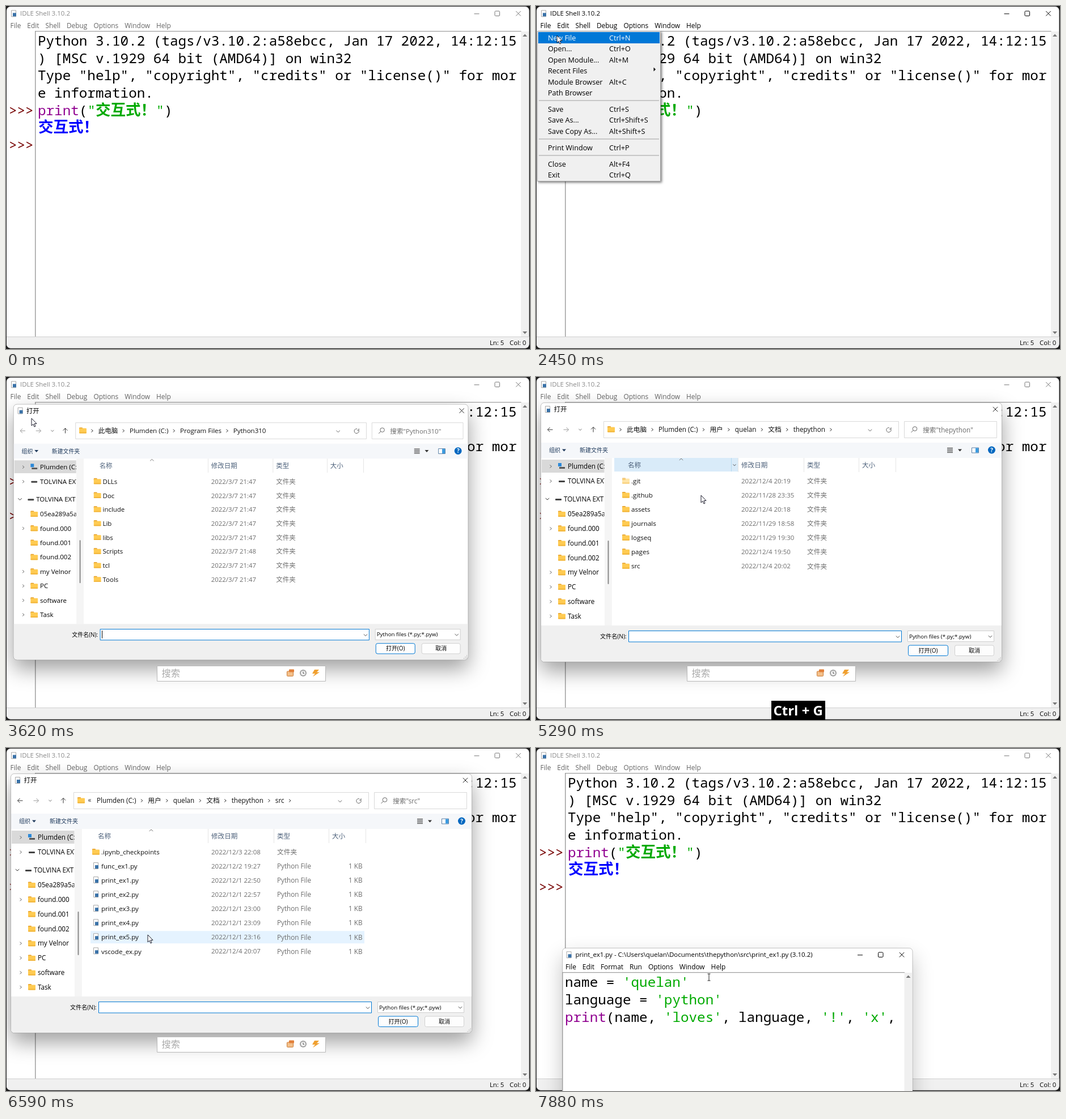
An HTML page with a canvas that plays this animation: 924 by 606 pixels, repeating every 8 s.

```html
<!DOCTYPE html>
<html lang="zh-CN">
<head>
<meta charset="utf-8">
<title>IDLE Shell</title>
<style>
html, body { margin: 0; width: 100%; height: 100%; overflow: hidden; background: #1c1c1c; }
canvas { display: block; width: 924px; height: 606px; }
</style>
</head>
<body>
<canvas id="stage" width="924" height="606"></canvas>
<script>
const c = document.getElementById('stage').getContext('2d');
const CJK = '"Noto Sans CJK SC","Noto Sans CJK","Noto Sans SC",sans-serif';
const UI = '"Open Sans",' + CJK;
const MONO = '"Noto Sans Mono",' + CJK;
const LOOP = 8000, STEP = 130;
const CODE = 24.28, PITCH = 14.57, LINE = 30.67;
const GREEN = '#00aa00', PURPLE = '#900090', BLUE = '#0067c0', GRAY = '#6d6d6d';

// Bursts of screen updates: start time, number of steps
const BURSTS = [[0, 1], [380, 1], [630, 7], [1540, 7], [2450, 7], [3360, 7],
  [4390, 4], [5030, 7], [5940, 6], [6840, 7], [7750, 2]];

// Pointer path: time, x, y
const PATH = [[500, 411, 364], [760, 330, 290], [1020, 150, 140], [1280, 55, 55], [1410, 36, 40],
  [1540, 24, 37], [2060, 22, 37], [2450, 37, 52], [2840, 45, 73], [3620, 45, 73],
  [4140, 232, 158], [5030, 245, 158], [5160, 268, 165], [5290, 291, 209], [5420, 322, 236],
  [5550, 316, 256], [5810, 270, 308], [5940, 258, 319], [6200, 250, 333], [6590, 250, 330],
  [6840, 250, 290], [7100, 247, 235], [7620, 247, 235], [7750, 305, 405]];
const CLICKS = [1670, 2970, 6200, 7100];

const FILE_MENU = [
  [56, 'New File', 'Ctrl+N'], [75.5, 'Open...', 'Ctrl+O'], [95, 'Open Module...', 'Alt+M'],
  [114, 'Recent Files', ''], [134, 'Module Browser', 'Alt+C'], [153, 'Path Browser', ''],
  [182, 'Save', 'Ctrl+S'], [201.5, 'Save As...', 'Ctrl+Shift+S'], [221, 'Save Copy As...', 'Alt+Shift+S'],
  [250, 'Print Window', 'Ctrl+P'], [279, 'Close', 'Alt+F4'], [298.5, 'Exit', 'Ctrl+Q']];

const DRIVE = 'Plumden (C:)';
const FOLDERS = {
  Python310: {
    path: ['此电脑', DRIVE, 'Program Files', 'Python310'],
    rows: 'DLLs Doc include Lib libs Scripts tcl Tools'.split(' ')
      .map(n => [n, '2022/3/7 21:4' + (n === 'Scripts' ? 8 : 7)])
  },
  thepython: {
    path: ['此电脑', DRIVE, '用户', 'quelan', '文档', 'thepython', ''],
    rows: [['.git', '2022/12/4 20:19'], ['.github', '2022/11/28 23:35'], ['assets', '2022/12/4 20:18'],
      ['journals', '2022/11/29 18:58'], ['logseq', '2022/11/29 19:30'], ['pages', '2022/12/4 19:50'],
      ['src', '2022/12/4 20:02']]
  },
  src: {
    path: [DRIVE, '用户', 'quelan', '文档', 'thepython', 'src', ''],
    rows: [['.ipynb_checkpoints', '2022/12/3 22:08'], ['func_ex1.py', '2022/12/2 19:27'],
      ['print_ex1.py', '2022/12/1 22:50'], ['print_ex2.py', '2022/12/1 22:57'],
      ['print_ex3.py', '2022/12/1 23:00'], ['print_ex4.py', '2022/12/1 23:09'],
      ['print_ex5.py', '2022/12/1 23:16'], ['vscode_ex.py', '2022/12/4 20:07']]
  }
};
const TREE = [['05ea289a5a', 0], ['found.000', 1], ['found.001', 0], ['found.002', 0],
  ['my Velnor', 1], ['PC', 1], ['software', 1], ['Task', 1]];

function rect(x, y, w, h, fill, stroke, r = 0) {
  c.beginPath();
  c.roundRect(x, y, w, h, r);
  if (fill) { c.fillStyle = fill; c.fill(); }
  if (stroke) { c.strokeStyle = stroke; c.lineWidth = 1; c.stroke(); }
}

function line(pts, color, width = 1) {
  c.beginPath();
  for (let i = 0; i < pts.length; i += 2) c.lineTo(pts[i], pts[i + 1]);
  c.strokeStyle = color;
  c.lineWidth = width;
  c.stroke();
}

function poly(pts, fill) {
  c.beginPath();
  for (let i = 0; i < pts.length; i += 2) c.lineTo(pts[i], pts[i + 1]);
  c.closePath();
  c.fillStyle = fill;
  c.fill();
}

function disc(x, y, r, fill) {
  c.beginPath();
  c.arc(x, y, r, 0, 7);
  c.fillStyle = fill;
  c.fill();
}

// Draws text centred vertically on y and returns its width
function text(s, x, y, size, color = '#000', font = UI, weight = 400) {
  c.font = `${weight} ${size}px ${font}`;
  c.fillStyle = color;
  c.fillText(s, x, y + size * 0.36);
  return c.measureText(s).width;
}

// parts: text and colour in turn
function code(x, y, ...parts) {
  for (let i = 0; i < parts.length; i += 2) {
    text(parts[i], x, y, CODE, parts[i + 1], MONO);
    x += parts[i].length * PITCH;
  }
}

function chevron(x, y, dir, color = '#666', s = 2.5) {
  const h = s * 0.6;
  if (dir === 'right') line([x - h, y - s, x + h, y, x - h, y + s], color);
  else {
    const k = dir === 'down' ? h : -h;
    line([x - s * 1.3, y - k, x, y + k, x + s * 1.3, y - k], color);
  }
}

function arrow(x, y, angle, color) {
  c.save();
  c.translate(x, y);
  c.rotate(angle);
  line([-4.5, 0, 4.5, 0], color);
  line([-0.5, -4, -4.5, 0, -0.5, 4], color);
  c.restore();
}

function cross(x, y, color, s = 4.2) {
  line([x - s, y - s, x + s, y + s], color);
  line([x - s, y + s, x + s, y - s], color);
}

function folder(x, y, faint) {
  c.globalAlpha = faint ? 0.5 : 1;
  rect(x, y - 5, 6, 4, '#e5a02c', null, 1);
  rect(x, y - 3.5, 13, 9, '#ffcb52', null, 1);
  rect(x, y + 3.5, 13, 2, '#f2b53a', null, 1);
  c.globalAlpha = 1;
}

function page(x, y) {
  rect(x + 0.5, y - 5.5, 8, 11, '#fff', '#a8a8a8');
  rect(x + 3, y - 1, 6, 6, '#3a72a8');
}

function pop(cx, cy, scale, alpha, draw) {
  c.save();
  c.globalAlpha = alpha;
  c.translate(cx, cy);
  c.scale(scale, scale);
  c.translate(-cx, -cy);
  draw();
  c.restore();
}

function shadowBox(x, y, w, h, depth) {
  c.save();
  c.shadowColor = `rgba(0,0,0,${depth})`;
  c.shadowBlur = 36;
  c.shadowOffsetY = 16;
  rect(x, y, w, h, '#fff', null, 6);
  c.restore();
  rect(x, y, w, h, null, 'rgba(0,0,0,.22)', 6);
}

// Title bar, menu bar, text border and scroll bar
function frame(x, y, right, bottom, left, title, menus, active) {
  const ink = active ? '#000' : '#777';
  const ty = y + 12.3, top = y + 43;
  page(x + 8, ty);
  text(title, x + 24, ty, 11.5, active ? '#000' : '#888');
  let mx = x + 6.5;
  for (const m of menus.split(' ')) mx += text(m, mx, y + 34, 11.9, active ? '#000' : '#666') + 11;
  line([right - 97, ty + 0.5, right - 88, ty + 0.5], ink);
  rect(right - 60.5, ty - 4.3, 8.5, 8.5, null, ink, 1.5);
  cross(right - 19, ty, ink);
  rect(right - 14.5, top + 1, 14, bottom - top - 1, '#f0f0f0');
  rect(left, top, right - left - 14, 1.2, '#a0a0a0');
  rect(left, top, 1.5, bottom - top, '#a0a0a0');
  const ax = right - 7.5;
  poly([ax - 4, top + 10, ax, top + 5.5, ax + 4, top + 10], '#777');
  poly([ax - 4, bottom - 9, ax, bottom - 4.5, ax + 4, bottom - 9], '#777');
}

function shell(active) {
  rect(0, 0, 924, 606, '#1c1c1c');
  rect(1, 1, 921.5, 603.5, '#fff', null, 7);
  frame(1, 1, 922.5, 584, 51, 'IDLE Shell 3.10.2', 'File Edit Shell Debug Options Window Help', active);
  rect(1, 584, 921.5, 20.5, '#f0f0f0', null, [0, 0, 7, 7]);
  rect(1, 584, 921.5, 1, '#d0d0d0');
  text('Ln: 5', 853, 595, 11.3);
  text('Col: 0', 888, 595, 11.3);

  const row = i => 61.3 + i * LINE;
  ['Python 3.10.2 (tags/v3.10.2:a58ebcc, Jan 17 2022, 14:12:15',
    ') [MSC v.1929 64 bit (AMD64)] on win32',
    'Type "help", "copyright", "credits" or "license()" for mor',
    'e information.'].forEach((s, i) => code(56, row(i), s, '#000'));
  code(56, row(4), 'print', PURPLE, '(', '#000', '"', GREEN);
  text('交互式！', 158, row(4) - 1, 26.5, GREEN, CJK, 700);
  code(264.5, row(4), '"', GREEN, ')', '#000');
  text('交互式！', 57, row(5) - 1, 26.5, '#0000ff', CJK, 700);
  for (const i of [4, 6]) code(5, row(i), '>>>', '#770000');
}

function fileMenu(y, alpha) {
  c.globalAlpha = alpha;
  c.save();
  c.shadowColor = 'rgba(0,0,0,.5)';
  c.shadowBlur = 4;
  c.shadowOffsetX = c.shadowOffsetY = 2;
  rect(2, 44, 218, 266, '#f0f0f0');
  c.restore();
  rect(2.5, 44.5, 217, 265, null, '#a0a0a0');
  for (const [my, label, keys] of FILE_MENU) {
    const on = Math.abs(y - my) < 9.7;
    if (on) rect(4, my - 10, 214, 20, '#0078d7');
    text(label, 21, my, 12.6, on ? '#fff' : '#000');
    text(keys, 129, my, 12.6, on ? '#fff' : '#000');
  }
  for (const sy of [167, 235, 264]) rect(5, sy - 0.5, 212, 1, '#a0a0a0');
  poly([207.5, 108.5, 211, 112, 207.5, 115.5], '#000');
  c.globalAlpha = 1;
}

function tree() {
  c.save();
  c.beginPath();
  c.rect(8, 143, 112.5, 296);
  c.clip();
  rect(10, 146, 112, 23, '#d9d9d9');
  chevron(26, 158, 'right');
  rect(39, 152, 6, 6, '#2b88d8');
  rect(41, 159, 10, 3, '#555');
  text(DRIVE, 56, 158, 11.7);
  chevron(26, 184, 'right');
  rect(40, 183, 11, 3, '#444', null, 1);
  text('TOLVINA EXT', 56, 184, 11.7);
  chevron(20, 215.5, 'down', '#333');
  rect(34, 215, 11, 3, '#444', null, 1);
  text('TOLVINA EXT', 49, 216, 11.7);
  TREE.forEach(([name, more], i) => {
    const y = 242 + i * 25.8;
    if (more) chevron(26, y, 'right');
    folder(39, y - 0.5);
    text(name, 56, y, 11.7);
  });
  c.restore();
  rect(121, 143, 13, 296, '#f5f5f5');
  rect(126.5, 289, 2, 77, '#8a8a8a', null, 1);
}

function fileList(rows, hover, selected) {
  const [hx, hy] = hover;
  if (hx > 138 && hx < 356 && hy > 143 && hy < 168) {
    rect(138, 143, 218, 24, '#d9ebf9');
    rect(344, 143, 1, 24, '#b5d9f0');
    chevron(350, 155.5, 'down', '#555', 2);
  }
  chevron(256, 145.5, 'up', '#777');
  for (const x of [356, 472, 569, 634]) rect(x, 143, 1, 25, '#e5e5e5');
  [['名称', 162], ['修改日期', 362], ['类型', 478], ['大小', 575]]
    .forEach(([s, x]) => text(s, x, 156, 11.6, '#4c607a'));

  rows.forEach(([name, date], i) => {
    const y = 184 + i * 25.05, file = name.endsWith('.py');
    if (i === selected) rect(149.5, y - 10.5, 482, 21, '#cce8ff', '#99d1ff');
    else if (hx > 149 && hx < 632 && Math.abs(hy - y) < 12.5) rect(149, y - 11, 483, 22, '#e5f3ff');
    if (file) page(154, y - 1);
    else folder(152, y - 1, name === '.git');
    text(name, 168, y, 11.6, '#111');
    text(date, 362, y, 11.5, GRAY);
    text(file ? 'Python File' : '文件夹', 478, y, 11.7, GRAY);
    if (file) text('1 KB', 604, y, 11.7, GRAY);
  });
}

function dialog(t, hover) {
  const name = t < 4520 ? 'Python310' : t < 6330 ? 'thepython' : 'src';
  const { path, rows } = FOLDERS[name];
  const picked = t >= 7100, closing = t >= 7230;

  shadowBox(8.5, 45.5, 813, 458, 0.38);
  if (!closing) {
    page(16, 57);
    cross(810, 57, '#222');
  }
  text('打开', closing ? 14 : 31.5, 57, 11.5);

  arrow(25, 93, 0, name === 'Python310' ? '#999' : '#333');
  arrow(53, 93, Math.PI, '#999');
  chevron(78, 93, 'down', '#777', 2);
  arrow(101, 93, Math.PI / 2, '#333');
  rect(119.5, 78.5, 520, 29, '#fff', '#d9d9d9');
  folder(126, 92);
  let x = 160;
  if (name === 'src') text('«', 144.5, 92, 11.7, '#333');
  else chevron(149, 93, 'right', '#333');
  path.forEach((s, i) => {
    if (i) {
      chevron(x + 10, 93, 'right', '#333');
      x += 21;
    }
    x += text(s, x, 93, 11.7, '#111');
  });
  chevron(589, 94, 'down');
  c.beginPath();
  c.arc(622, 93.5, 4, -0.4, 5);
  c.strokeStyle = '#666';
  c.stroke();
  line([626, 89, 626, 92, 623, 92], '#666');
  rect(649.5, 78.5, 163, 29, '#fff', '#d9d9d9');
  c.beginPath();
  c.arc(668, 91.5, 3.8, 0, 7);
  c.strokeStyle = '#666';
  c.stroke();
  line([665.3, 94.2, 661.5, 98], '#666');
  text(`搜索"${name}"`, 682, 93.5, 11.7, GRAY);

  rect(9, 116, 812, 27, '#f5f7fa');
  text('组织', 23, 129.5, 10.1, '#1e395b');
  poly([46, 127.5, 53, 127.5, 49.5, 131.5], '#1e395b');
  text('新建文件夹', 77, 129.5, 10, '#1e395b');
  for (let i = 0; i < 4; i++) rect(725, 125 + i * 2.6, 10, 1.1, '#333');
  poly([744, 127.5, 751, 127.5, 747.5, 131.5], '#333');
  rect(768.5, 125, 12, 9, '#fff', '#5a7fa5');
  rect(775, 125.5, 5, 8, '#3b9be0');
  disc(803.5, 129, 6.5, BLUE);
  text('?', 801.2, 129, 10, '#fff', UI, 700);

  tree();
  fileList(rows, hover, picked ? 2 : -1);

  rect(9, 439, 812, 64, '#f0f0f0', null, [0, 0, 6, 6]);
  text('文件名(N):', 113, 458, 10.1);
  rect(163.5, 448.5, 481, 19.5, '#fff', closing ? '#8a8a8a' : '#0078d4');
  chevron(638, 459, 'down', '#555');
  if (picked) text('print_ex1.py', 167, 459, 9.8);
  else if (Math.floor((t - 3490) / 530) % 2 === 0) rect(166.5, 451, 1, 14, '#000');
  rect(655.5, 448.5, 152, 19, '#fff', '#d0d0d0');
  text('Python files (*.py;*.pyw)', 658, 458, 9.8);
  chevron(801, 458.5, 'down', '#555');
  rect(656.5, 474, 70, 18.5, '#fdfdfd', '#0078d4', 3);
  text('打开(O)', 674.5, 483, 10.1);
  rect(738.5, 474, 69, 18.5, '#fdfdfd', '#d0d0d0', 3);
  text('取消', 763, 483, 10.1);
  for (let i = 0; i < 3; i++)
    for (let j = 0; j <= i; j++) rect(818.5 - j * 2.6, 495 + i * 2.6, 1.3, 1.3, '#b5b5b5');
}

function searchBar() {
  rect(266.5, 510.5, 297, 27, '#fff', '#b8b8b8');
  text('搜索', 274.5, 523, 16.3, '#aaa');
  rect(495.5, 520, 11, 8.5, '#f3c08b', '#c97a35', 1);
  rect(499, 516.5, 9, 5, '#e2803a', null, 1);
  disc(524, 523, 6, '#a0a0a0');
  disc(524, 523, 4, '#f2f2f2');
  line([524, 520.5, 524, 523.5, 526, 523.5], '#555');
  poly([544, 517, 552, 517, 548, 521.5, 553, 521.5, 541, 529.5, 545, 524, 540, 524], '#f0a030');
}

function editor() {
  shadowBox(46.5, 353.5, 617.5, 300, 0.24);
  frame(45.5, 353, 664, 650, 46, 'print_ex1.py - C:\\Users\\quelan\\Documents\\thepython\\src\\print_ex1.py (3.10.2)',
    'File Edit Format Run Options Window Help', true);
  const row = i => 413.5 + i * LINE;
  code(51, row(0), 'name = ', '#000', "'quelan'", GREEN);
  code(51, row(1), 'language = ', '#000', "'python'", GREEN);
  code(51, row(2), 'print', PURPLE, '(name, ', '#000', "'loves'", GREEN, ', language, ', '#000',
    "'!'", GREEN, ', ', '#000', "'x'", GREEN, ',', '#000');
}

function pointerAt(t) {
  const i = PATH.findIndex(p => p[0] > t);
  if (i === 0) return PATH[0].slice(1);
  if (i < 0) return PATH[PATH.length - 1].slice(1);
  const [t0, x0, y0] = PATH[i - 1], [t1, x1, y1] = PATH[i];
  const k = (t - t0) / (t1 - t0);
  return [x0 + (x1 - x0) * k, y0 + (y1 - y0) * k];
}

function pointer(t, [x, y]) {
  if (CLICKS.some(k => t >= k && t < k + 2 * STEP)) disc(x, y, 10, 'rgba(224,230,60,.75)');
  if (t < 1250 || t >= 7360) {
    line([x, y - 6, x, y + 6], '#222');
    line([x - 2.5, y - 6, x + 2.5, y - 6], '#222');
    line([x - 2.5, y + 6, x + 2.5, y + 6], '#222');
    return;
  }
  const shape = [0, 0, 0, 13, 3, 10.3, 5, 15, 7, 14, 5, 9.6, 9, 9.4].map((v, i) => v + (i % 2 ? y : x));
  poly(shape, '#fff');
  line([...shape, x, y], '#1a1a2a');
}

function snap(t) {
  const [start, n] = BURSTS.filter(b => b[0] <= t).pop();
  return start + Math.min(n - 1, Math.floor((t - start) / STEP)) * STEP;
}

function draw(t) {
  const within = (a, b) => t >= a && t < b;
  const at = pointerAt(t);
  shell(within(1670, 3100) || within(7230, 7490));
  if (within(1800, 3100)) fileMenu(at[1], t < 1930 ? 0.6 : 1);
  if (within(3490, 7360)) {
    const scale = t < 3620 ? 0.95 : t < 3750 ? 0.986 : 1;
    pop(350, 240, scale, t < 3620 ? 0.6 : 1, () => dialog(t, pointerAt(t - STEP)));
  }
  if (within(3620, 7230)) searchBar();
  if (t >= 7750) pop(355, 500, t < 7880 ? 0.96 : 1, t < 7880 ? 0.6 : 1, editor);
  if (within(4390, 5550)) {
    rect(415, 572, 95, 34, '#000');
    text('Ctrl + G', 418.5, 589.5, 24, '#fff', UI, 700);
  }
  if (t >= 380) pointer(t, at);
}

function tick(now) {
  draw(snap(now % LOOP));
  requestAnimationFrame(tick);
}
requestAnimationFrame(tick);
</script>
</body>
</html>
```
